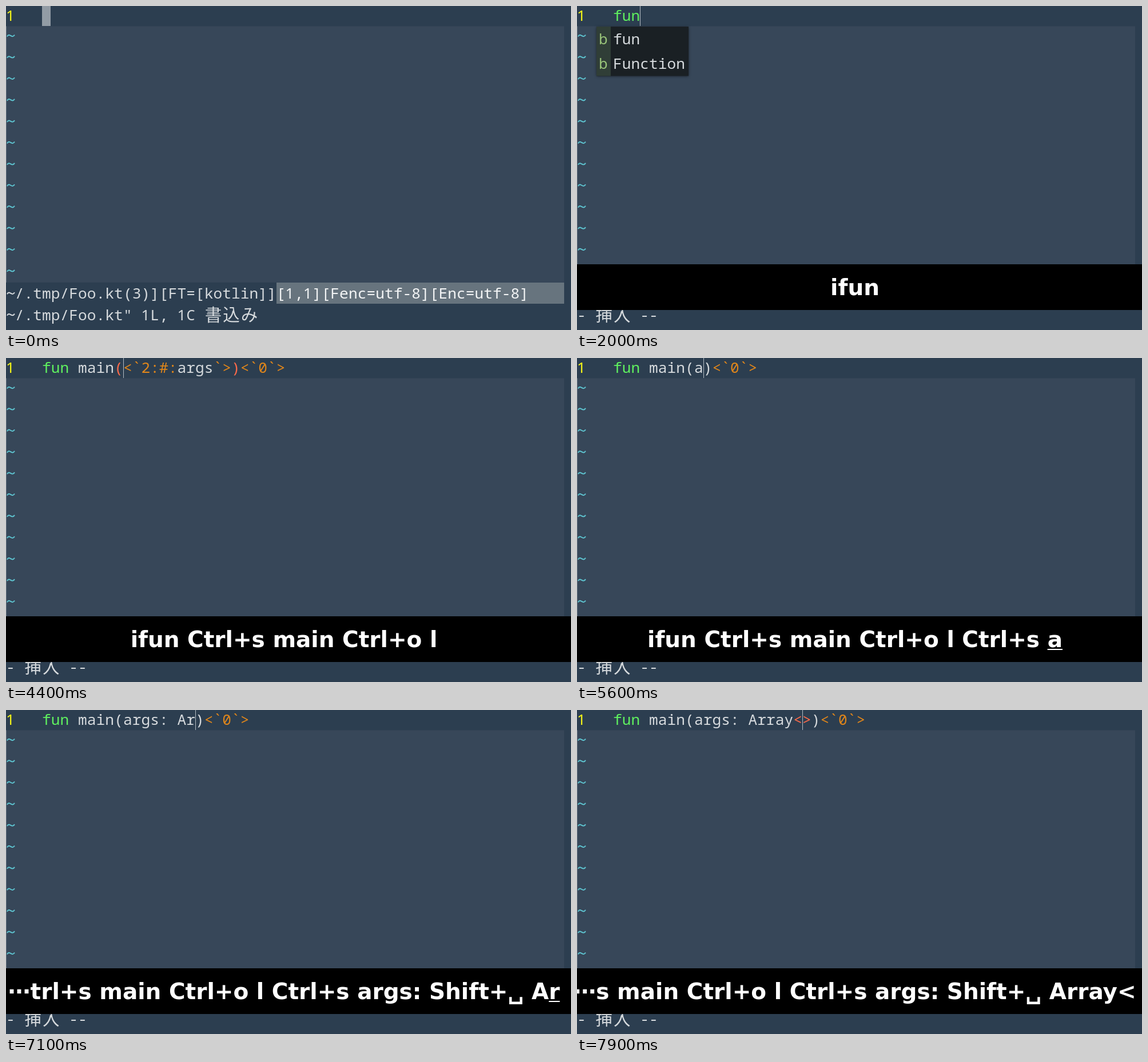
An HTML page with a canvas that plays this animation: 988 px wide and 567 px high, repeating every 8000 ms.

```html
<!DOCTYPE html>
<html lang="ja">
<head>
<meta charset="utf-8">
<title>Kotlin snippet in an editor</title>
<style>
  html, body { margin: 0; width: 100%; height: 100%; overflow: hidden; background: #2c3e50; }
  canvas { display: block; }
</style>
</head>
<body>
<canvas id="stage" width="988" height="567"></canvas>
<script>
const ctx = document.getElementById('stage').getContext('2d');
const LOOP = 8000, CELL = 15.76, ROW = 37.4, BASE = 26;
const CODE = '26.2px "Noto Sans Mono", "DejaVu Sans Mono", monospace';
const ONE = '26.2px "Noto Sans", sans-serif';
const WIDE = '29.5px "Noto Sans CJK JP", "Noto Sans CJK", sans-serif';
const KEYS = 'bold 39px "DejaVu Sans", sans-serif';
const COLOR = {
  back: '#2c3e50', pane: '#374759', bar: '#67747e', block: '#929ca5', caret: '#b4bcc3',
  text: '#d6dadd', keyword: '#5ff05f', hole: '#e0861a', match: '#fb6a4a',
  number: '#f6f618', tilde: '#5ec4d0'
};

// Snippet tails, "|" in a line is the caret.
const END = ')<`0`>', ARGS = '(<`2:#:args`>' + END;
const INSERT = '- 挿入 --', SELECT = '- 選択 --', ONCE = '- (挿入) --';
const K1 = 'ifun Ctrl+s ', K2 = K1 + 'main', K3 = K2 + ' Ctrl+o', K4 = K3 + ' l';
const K5 = K4 + ' Ctrl+s', K6 = K5 + ' args', K7 = K6 + ': Shift+␣';

// Each step changes only what it names; mark = underlined keys, popup lasts one step unless kept.
const steps = [
  { t: 0, line: '|', mode: '~/.tmp/Foo.kt" 1L, 1C 書込み', block: true, keys: '', mark: 0 },
  { t: 1200, keys: 'i', mark: 1, mode: INSERT, block: false },
  { t: 1400, keys: 'if', line: 'f|' },
  { t: 1500, popup: ['fun', 'for', 'file', 'filter', 'forEachIndexed'] },
  { t: 1600, keys: 'ifu', line: 'fu|', popup: null },
  { t: 1700, popup: ['fun', 'Function'] },
  { t: 1800, keys: 'ifun', line: 'fun|' },
  { t: 2000, mark: 0 },
  { t: 2600, keys: K1.trim(), mark: 6, line: 'fun name|' + ARGS, mode: SELECT, popup: null },
  { t: 2800, keys: K1 + 'ma', mark: 2, line: 'fun m|' + ARGS, mode: INSERT },
  { t: 2900, line: 'fun ma|' + ARGS, popup: ['ma', 'main', 'minusAssign', 'modAssign'] },
  { t: 3000, keys: K2, line: 'fun main|' + ARGS, popup: ['main'] },
  { t: 3200, mark: 0 },
  { t: 3600, keys: K3, mark: 6, mode: ONCE, block: true, popup: null },
  { t: 3800, mark: 0 },
  { t: 4200, keys: K4, mark: 1, mode: INSERT, block: false, line: 'fun main(|' + ARGS.slice(1) },
  { t: 4400, mark: 0 },
  { t: 5200, keys: K5, mark: 6 },
  { t: 5300, line: 'fun main(args|' + END, mode: '' },
  { t: 5400, mark: 0, mode: SELECT },
  { t: 5600, keys: K5 + ' a', mark: 1, line: 'fun main(a|' + END, mode: INSERT },
  { t: 5700, keys: K5 + ' ar', mark: 2, line: 'fun main(ar|' + END },
  { t: 5800, line: 'fun main(arg|' + END },
  { t: 5900, keys: K6, line: 'fun main(args|' + END },
  { t: 6100, mark: 0 },
  { t: 6300, keys: K6 + ':', mark: 1, line: 'fun main(args:|' + END },
  { t: 6500, keys: K7, mark: 7, line: 'fun main(args: |' + END },
  { t: 6700, mark: 0 },
  { t: 6900, keys: K7 + ' A', mark: 1, line: 'fun main(args: A|' + END },
  { t: 7100, keys: K7 + ' Ar', line: 'fun main(args: Ar|' + END },
  { t: 7200, popup: ['Array', 'ArrayList'] },
  { t: 7300, keys: K7 + ' Arra', mark: 2, line: 'fun main(args: Arra|' + END, popup: null },
  { t: 7400, popup: ['Array', 'ArrayList'] },
  { t: 7500, keys: K7 + ' Array', mark: 1, line: 'fun main(args: Array|' + END, popup: null },
  { t: 7600, popup: ['Array', 'ArrayList'] },
  { t: 7700, keys: K7 + ' Array<', line: 'fun main(args: Array<|>' + END, popup: null },
  { t: 7900, mark: 0 }
];

function rect(x, y, w, h, color) {
  ctx.fillStyle = color;
  ctx.fillRect(x, y, w, h);
}

function tilde(x, y, color) {
  ctx.strokeStyle = color;
  ctx.lineWidth = 2;
  ctx.beginPath();
  ctx.moveTo(x + 2, y + 2);
  ctx.bezierCurveTo(x + 6, y - 6, x + 10, y + 7, x + 15, y - 1);
  ctx.stroke();
}

// Writes text on the character grid; colorAt may be a colour or a function of the index.
function write(text, x, y, colorAt) {
  [...text].forEach((ch, i) => {
    const color = typeof colorAt === 'function' ? colorAt(i) : colorAt;
    const wide = ch > '\u2fff';
    ctx.fillStyle = color;
    ctx.font = wide ? WIDE : ch === '1' ? ONE : CODE;
    if (ch === '~') tilde(x, y - 10, color);
    else ctx.fillText(ch, wide ? x + 1 : x, wide ? y + 1 : y);
    x += wide ? 2 * CELL : CELL;
  });
}

function lineColors(code, bracket) {
  const colors = Array(code.length).fill(COLOR.text);
  const paint = (pattern, color) => {
    for (const m of code.matchAll(pattern)) colors.fill(color, m.index, m.index + m[0].length);
  };
  paint(/^fun/g, COLOR.keyword);
  paint(/<`\d(:#:)?|`>/g, COLOR.hole);
  const close = { '(': ')', '<': '>' }[code[bracket]];
  if (close) colors[bracket] = colors[code.indexOf(close, bracket)] = COLOR.match;
  return i => colors[i];
}

function drawLine({ line, mode, block }) {
  const caret = line.indexOf('|'), code = line.replace('|', '');
  const left = 4 * CELL, x = left + caret * CELL;
  if (mode === SELECT) rect(x - 4 * CELL, 0, 4 * CELL, 35, COLOR.bar);
  if (block) rect(Math.round(x), 0, 15, 35, COLOR.block);
  write('1', 0, BASE, COLOR.number);
  write(code, left, BASE, lineColors(code, block ? caret : caret - 1));
  if (!block && mode !== SELECT) rect(Math.round(x), 0, 1, 35, COLOR.caret);
}

function drawPopup({ popup, line }) {
  if (!popup) return;
  const word = line.split('|')[0].match(/\w*$/);
  const x = (4 + word.index) * CELL, pitch = 43.2;
  const longest = Math.max(...popup.map(item => item.length));
  const right = x + longest * CELL + 6, height = popup.length * pitch;
  ctx.save();
  ctx.shadowColor = 'rgba(0,0,0,.6)';
  ctx.shadowBlur = 5;
  ctx.shadowOffsetY = 1;
  rect(x - 29, 36, right - x + 29, height, '#1a2024');
  ctx.restore();
  rect(x - 29, 36, 25, height, '#303e37');
  popup.forEach((item, i) => {
    const y = 67 + i * pitch;
    write('b', x - 25, y, '#98c379');
    write(item, x, y, COLOR.text);
  });
}

function drawKeys({ keys, mark }) {
  if (!keys) return;
  const shown = keys.length > 44 ? '⋯' + keys.slice(-43) : keys;
  rect(0, 452, 988, 80, '#000');
  ctx.font = KEYS;
  ctx.fillStyle = '#fff';
  const width = ctx.measureText(shown).width, x = 486 - width / 2;
  ctx.fillText(shown, x, 506);
  if (mark) {
    const start = ctx.measureText(shown.slice(0, -mark)).width;
    rect(x + start, 509, width - start, 2, '#fff');
  }
}

function draw(time) {
  const state = Object.assign({}, ...steps.filter(step => step.t <= time));
  rect(0, 0, 988, 567, COLOR.back);
  rect(0, 35.4, 976, 448.4, COLOR.pane);
  rect(0, 35.4, 1, 448.4, '#667380');
  for (let row = 0; row < 12; row++) tilde(0, 51.5 + row * ROW, COLOR.tilde);
  rect(473, 484, 503, 37, COLOR.bar);
  write('~/.tmp/Foo.kt(3)][FT=[kotlin]]', 0, BASE + 13 * ROW, COLOR.text);
  write('[1,1][Fenc=utf-8][Enc=utf-8]', 30 * CELL, BASE + 13 * ROW, '#f2f4f5');
  write(state.mode, 0, BASE + 14 * ROW, COLOR.text);
  if (state.mode === SELECT) write('4', 51 * CELL, BASE + 14 * ROW, COLOR.text);
  drawLine(state);
  drawPopup(state);
  drawKeys(state);
}

const begin = performance.now();
function tick() {
  draw((performance.now() - begin) % LOOP);
  requestAnimationFrame(tick);
}
tick();
</script>
</body>
</html>
```
